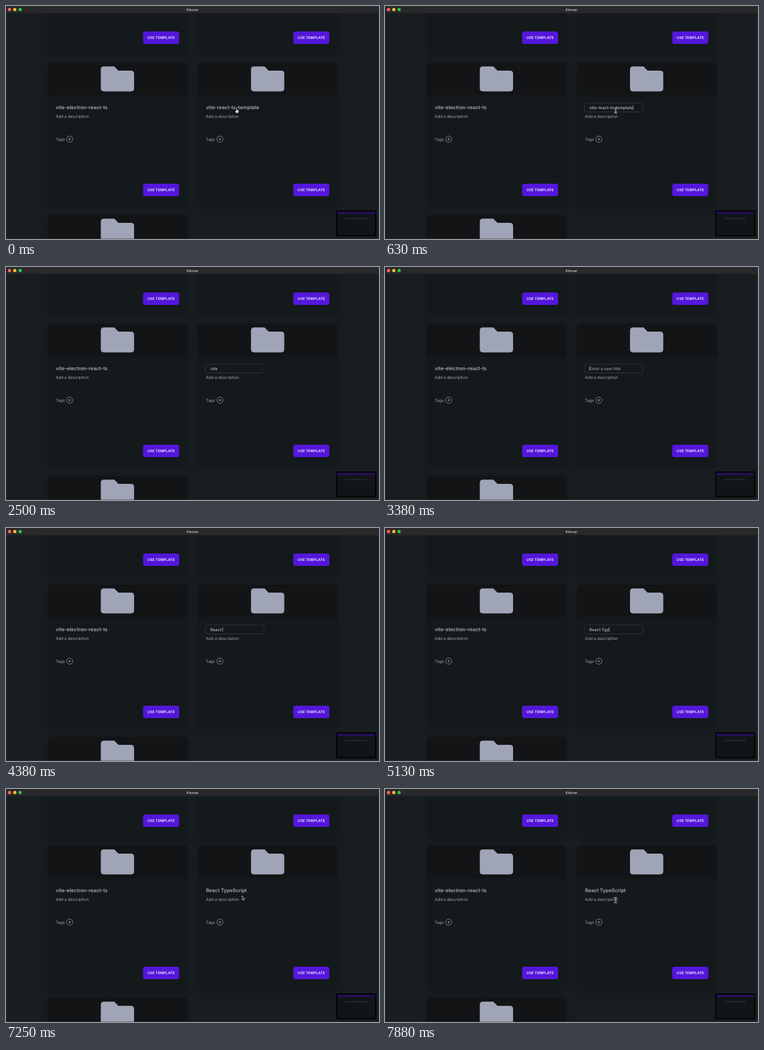
Write an HTML page that moves like this. It is 600 by 375 pixels and loops after 8000 ms.

```html
<!DOCTYPE html>
<html lang="en">
<head>
<meta charset="utf-8">
<title>Template gallery</title>
<style>
  html, body { margin: 0; width: 100%; height: 100%; overflow: hidden; background: #181d20; }
  svg { display: block; width: 600px; height: 375px; }
  text { font-family: Inter, "Open Sans", sans-serif; fill: #a6adbb; white-space: pre; text-rendering: geometricPrecision; }
  .title { font-size: 7.94px; font-weight: 600; }
  .body { font-size: 6.4px; }
  .label { font-size: 5.83px; font-weight: 600; fill: #eee9fd; text-anchor: middle; }
  .field { font-size: 6.5px; font-weight: 600; }
  .card { filter: drop-shadow(0 5px 5px rgba(0, 0, 0, .1)); }
</style>
</head>
<body>
<svg viewBox="0 0 600 375">
  <defs>
    <g id="card">
      <rect class="card" width="225" height="231" rx="7" fill="#14191c"/>
      <path d="M0 53V7Q0 0 7 0H218Q225 0 225 7V53Z" fill="#131416"/>
      <path d="M90.500 6.300H107.200L113.900 13H134Q139 13 139 18V41.500Q139 46.400 134 46.400H90.500Q85.500 46.400 85.500 41.500V11.300Q85.500 6.300 90.500 6.300Z" fill="#9fa4b7"/>
      <text class="body" x="13" y="89">Add a description</text>
      <text class="body" x="13" y="125.600">Tags</text>
      <g fill="none" stroke="#a6adbb" stroke-width=".7">
        <circle cx="35.400" cy="123.300" r="5"/>
        <path d="M33.200 123.300h4.400M35.400 121.100v4.400"/>
      </g>
      <rect x="153.500" y="195" width="58" height="20" rx="3.500" fill="#5417db"/>
      <text class="label" x="182.500" y="207.100">USE TEMPLATE</text>
    </g>
  </defs>

  <rect width="600" height="375" fill="#181d20"/>
  <use href="#card" x="67" y="-154"/>
  <use href="#card" x="308.600" y="-154"/>
  <use href="#card" x="67" y="91"/>
  <use href="#card" x="308.600" y="91"/>
  <use href="#card" x="67" y="336"/>

  <text class="title" x="80" y="166.200">vite-electron-react-ts</text>
  <text class="title" id="title" x="321.700" y="166.200"></text>

  <g id="edit">
    <rect x="320.500" y="156.200" width="94.500" height="14.300" rx="3.800" fill="#14191c" stroke="#353b41" stroke-width=".8"/>
    <text class="field" id="field" x="328.800" y="165.800"></text>
    <rect id="caret" y="159.800" width=".7" height="7.200" fill="#b4bac6"/>
  </g>

  <rect width="600" height="11.500" fill="#29282b"/>
  <circle cx="5.700" cy="5.700" r="2.600" fill="#ff5f57"/>
  <circle cx="14.200" cy="5.700" r="2.600" fill="#febc2e"/>
  <circle cx="22.700" cy="5.700" r="2.600" fill="#28c840"/>
  <text x="300" y="7.700" text-anchor="middle" font-size="5.500" font-weight="600" style="fill:#c6c5c7">Kitovar</text>
  <path d="M.3 11V374.700H599.700V11" fill="none" stroke="#34393c" stroke-width=".6"/>

  <g>
    <rect x="531" y="329" width="64.500" height="41.500" rx="1.500" fill="#020203"/>
    <rect x="533" y="331" width="60.500" height="37.500" fill="#121518"/>
    <rect x="533" y="331.300" width="60.500" height="3.500" fill="#260f5c"/>
    <text x="563.300" y="342.600" text-anchor="middle" font-size="2.400" style="fill:#62666d">Set up your template directory</text>
  </g>

  <g id="hand">
    <path d="M-1.300 .6V-3.300Q-1.300 -4.200 -.6 -4.200T.1 -3.300V-1.300L2.400 -.7Q3.100 -.4 3 .5L2.500 2.600L2 4.100H-1.200L-3 1.300Q-3.300 .5 -2.600 .4Z" fill="#fff" stroke="#111" stroke-width=".6"/>
    <path d="M-.3 1.300V3M.8 1.300V3M1.800 1.300V3" stroke="#333" stroke-width=".35"/>
  </g>
  <path id="arrow" d="M0 0V6.500L1.500 5.200L2.500 7.500L3.600 7L2.600 4.800H4.600Z" fill="#0b0b0c" stroke="#fff" stroke-width=".6"/>
  <g id="beam" fill="none" stroke-linecap="round">
    <path d="M-1.700 -4Q0 -4 0 -3V3Q0 4 -1.700 4M1.700 -4Q0 -4 0 -3M1.700 4Q0 4 0 3M-.9 .8H.9" stroke="#eee" stroke-width="1.500"/>
    <path d="M-1.700 -4Q0 -4 0 -3V3Q0 4 -1.700 4M1.700 -4Q0 -4 0 -3M1.700 4Q0 4 0 3M-.9 .8H.9" stroke="#111" stroke-width=".6"/>
  </g>
</svg>
<script>
const LOOP = 8000;
const OLD = 'vite-react-ts-template', NEW = 'React TypeScript', HINT = 'Enter a new title';
const OPEN = 250, CLEARED = 2880, CLOSE = 6750;

// [time, characters left or typed]
const erase = [[0, 22], [1130, 21], [1250, 19], [1380, 17], [1500, 16], [1630, 14], [1750, 13], [1880, 11],
  [2000, 10], [2130, 8], [2250, 7], [2380, 6], [2500, 4], [2630, 3], [2750, 1], [CLEARED, 0]];
const type = [[0, 0], [3750, 1], [3880, 2], [4000, 3], [4130, 4], [4250, 5], [4380, 6], [4750, 7],
  [4880, 8], [5000, 9], [5250, 10], [5500, 11], [5750, 12], [6000, 13], [6130, 14], [6250, 15], [6380, 16]];
const blink = [[0, false], [630, true], [1130, false], [3130, true], [3500, false], [3750, true]];
// [time, shape, x, y]
const pointer = [[0, 'hand', 371.5, 168.3], [OPEN, 'beam', 371, 168.3], [1130, ''],
  [7000, 'arrow', 376, 168], [7130, 'arrow', 379, 171], [7250, 'arrow', 379.5, 171.7],
  [7380, 'arrow', 379, 173], [7500, 'arrow', 377.5, 175.5], [7630, 'beam', 373.5, 180.5],
  [7750, 'beam', 371.5, 181.5], [7880, 'beam', 370.8, 178.8]];

const el = id => document.getElementById(id);
const [title, edit, field, caret] = ['title', 'edit', 'field', 'caret'].map(el);
const cursors = ['hand', 'arrow', 'beam'].map(el);
const show = (node, on) => node.setAttribute('visibility', on ? 'visible' : 'hidden');
const at = (steps, t) => steps.findLast(s => s[0] <= t);

function setText(node, s) {
  if (node.textContent !== s) node.textContent = s;
}

function draw(t) {
  const editing = t >= OPEN && t < CLOSE;
  const value = t < CLEARED ? OLD.slice(0, at(erase, t)[1]) : NEW.slice(0, at(type, t)[1]);

  setText(title, t < CLOSE ? OLD : NEW);
  show(title, !editing);
  show(edit, editing);
  setText(field, value || HINT);
  field.style.fill = value ? '#a6adbb' : '#858b96';
  show(caret, editing && at(blink, t)[1]);
  caret.setAttribute('x', 328.8 + (value ? field.getComputedTextLength() : 0));

  const [, shape, x, y] = at(pointer, t);
  for (const c of cursors) {
    show(c, c.id === shape);
    if (c.id === shape) c.setAttribute('transform', `translate(${x} ${y})`);
  }
}

const start = performance.now();
function tick() {
  draw((performance.now() - start) % LOOP);
  requestAnimationFrame(tick);
}
tick();
</script>
</body>
</html>
```
